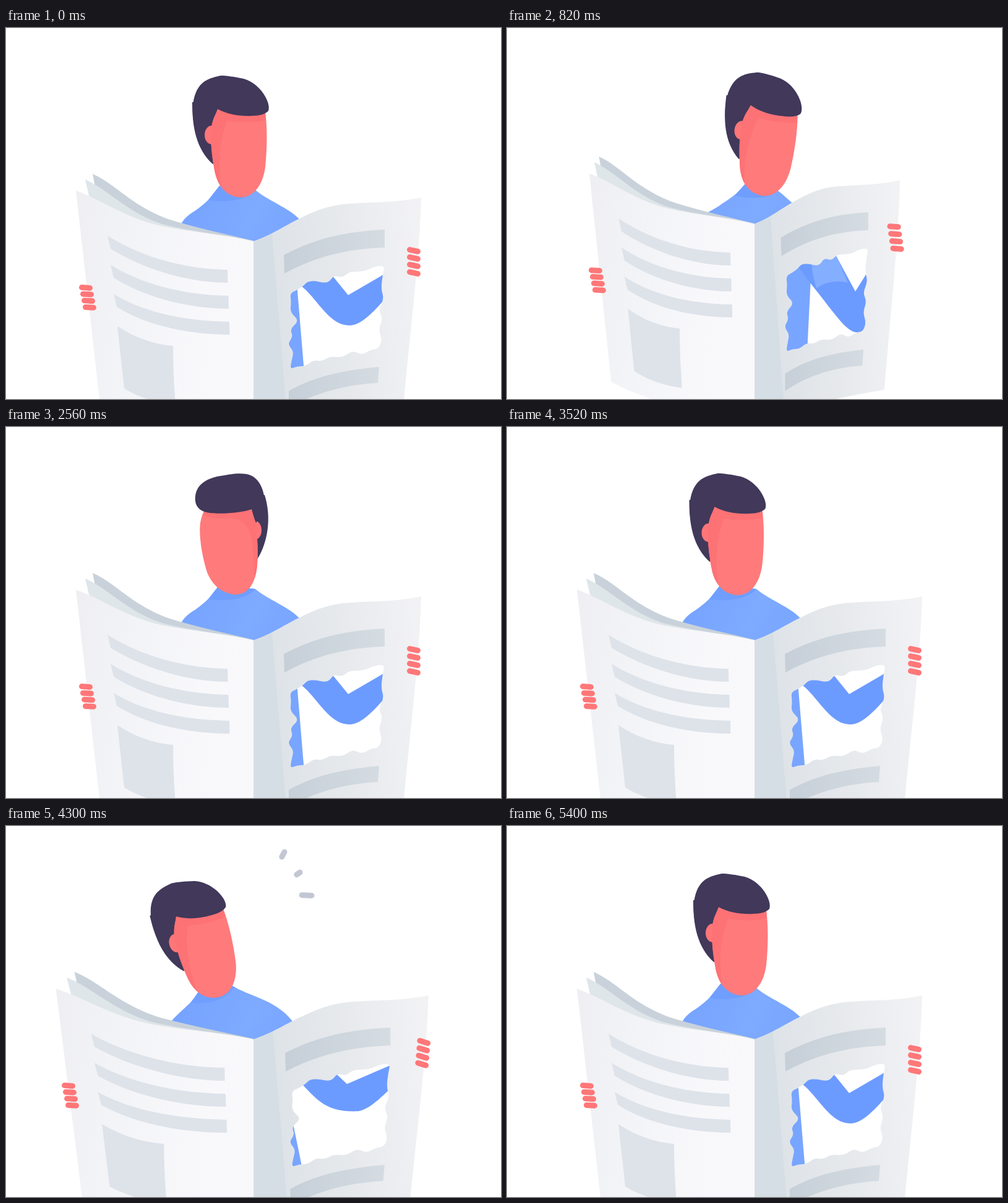
Write an HTML page that moves like this. It is 800 px wide and 600 px high and loops after 5.42 s.

```html
<!DOCTYPE html>
<html lang="en">
<head>
<meta charset="utf-8">
<title>Newspaper reader</title>
<style>
  html, body { margin: 0; width: 100%; height: 100%; overflow: hidden; background: #fff; }
  svg { display: block; width: 800px; height: 600px; }
</style>
</head>
<body>
<svg viewBox="0 0 800 600">
  <defs>
    <linearGradient id="shirt" gradientUnits="userSpaceOnUse" x1="290" y1="270" x2="460" y2="350">
      <stop offset="0" stop-color="#76a3ff"/><stop offset=".6" stop-color="#7eaaff"/><stop offset="1" stop-color="#78a5ff"/>
    </linearGradient>
    <linearGradient id="leftFill" gradientUnits="userSpaceOnUse" x1="113" y1="300" x2="400" y2="340">
      <stop offset="0" stop-color="#efeff3"/><stop offset=".3" stop-color="#f2f3f6"/><stop offset=".75" stop-color="#f8f8fb"/><stop offset="1" stop-color="#f9f9fb"/>
    </linearGradient>
    <linearGradient id="rightFill" gradientUnits="userSpaceOnUse" x1="430" y1="400" x2="670" y2="380">
      <stop offset="0" stop-color="#dee3e8"/><stop offset=".45" stop-color="#e6e9ec"/><stop offset="1" stop-color="#f2f2f5"/>
    </linearGradient>
    <linearGradient id="barFill" gradientUnits="userSpaceOnUse" x1="450" y1="0" x2="612" y2="0">
      <stop offset="0" stop-color="#c6cfd8"/><stop offset="1" stop-color="#d5dce2"/>
    </linearGradient>
    <clipPath id="faceClip"><path id="faceEdge"/></clipPath>
  </defs>

  <path id="body" fill="url(#shirt)"/>
  <path id="collar" fill="#6f9eff"/>
  <path id="arm" fill="#6c9bff"/>
  <path id="sleeve" fill="#84aeff"/>

  <g id="head">
    <path id="hairBack" fill="#41385a"/>
    <ellipse id="ear" ry="15" fill="#ff7678"/>
    <path id="face" fill="#ff7a7b"/>
    <path id="shade" fill="#fd7275" clip-path="url(#faceClip)"/>
    <path id="fringe" fill="#41385a"/>
  </g>

  <path id="sheetB" fill="#c9d2da" d="M140 236C174 250 202 287 262 309C300 321 345 331 400 344V400L160 340Z"/>
  <path id="sheetA" fill="#dfe6ea" d="M128 245C165 261 195 298 252 317C300 330 350 333 400 345V400L150 340Z"/>

  <g id="leftPage">
    <path fill="url(#leftFill)" d="M113 263C155 278 190 306 250 320C300 331 355 334 400 345V660C320 655 210 632 151 600Z"/>
    <path id="leftBars" fill="#dee3ea"/>
    <path fill="#dee3ea" d="M180 482C205 499 235 511 270 514Q270 560 274 610Q225 604 191 583Z"/>
  </g>
  <g id="rightPage">
    <path id="rightSheet" fill="url(#rightFill)" fill-rule="evenodd"/>
    <path fill="#d6dee5" d="M400 345L430 333L455 640L400 660Z"/>
    <path fill="url(#barFill)" d="M449 367C500 340 550 329 612 326V355C550 357 500 370 450 397Z"/>
    <path fill="url(#barFill)" d="M457 587C500 562 550 553 603 548L601 574C550 577 500 589 457 615Z"/>
  </g>

  <g stroke="#ff7779" stroke-width="9" stroke-linecap="round">
    <g id="leftHand"></g>
    <g id="rightHand"></g>
  </g>
  <g id="marks" stroke="#c2c7d3" stroke-width="9" stroke-linecap="round"></g>
</svg>
<script>
const LOOP = 5420;
const $ = id => document.getElementById(id);
const lerp = (a, b, k) => a + (b - a) * k;
const setPath = (id, d) => $(id).setAttribute('d', d);
const move = (id, value) => $(id).setAttribute('transform', value);

// Poses of the same path: at rest, leaning in, leaning back
const BODY = [
  'M270 340 L283 317 C290 305 297 301 305 296 C325 282 338 268 345 255 L403 262 C425 280 455 290 473 308 C478 340 470 390 471 425 L481 545 L485 640 L270 640Z',
  'M310 315 L325 298 C332 294 340 290 348 284 C365 273 377 264 385 252 L435 261 C445 268 452 275 461 283 C475 310 492 370 491 405 L486 505 L484 640 L270 640Z',
  'M253 335 L267 316 C274 307 284 299 292 291 C301 283 307 275 312 266 L365 258 C390 275 435 280 462 315 C470 340 450 400 452 425 L477 545 L485 640 L253 640Z'];
const COLLAR = [
  'M345 255 L403 262 C390 278 355 284 327 278Z',
  'M385 252 L437 262 C430 275 395 278 368 271Z',
  'M312 266 L368 260 C355 284 320 289 298 286Z'];
const ARM = [
  'M430 345 L500 350 L527 400 L553 432 L620 393 L620 430 C595 458 575 481 555 481 C522 481 505 440 478 418Z',
  'M430 330 L515 330 L530 365 L563 426 L595 375 L600 488 C590 491 575 494 563 492 C545 488 525 455 489 411Z',
  'M430 345 L500 370 L533 400 L551 417 L630 383 L630 415 C604 443 582 461 567 461 C520 462 505 446 480 419Z'];
const SLEEVE = [
  'M478 340 L510 345 L520 390 C510 386 500 386 490 392 C486 385 482 365 478 350Z',
  'M478 340 L522 345 L551 412 C535 408 515 410 500 421 C496 405 492 395 493 375Z',
  'M478 340 L510 345 L520 390 C510 386 500 386 490 392 C486 385 482 365 478 350Z'];

// Head shapes: facing right, facing left
const HAIR_BACK = [
  'M301 120 C301 160 307 195 334 220 C345 215 350 200 350 190 C352 160 352 130 350 115Z',
  'M385 110 C384 150 386 195 390 205 C394 212 400 215 406 214 C424 185 429 145 418 110Z'];
const FACE = [
  'M345 125 L418 128 C423 160 422 195 419 225 C415 255 400 273 380 274 C355 273 343 255 338 235 C332 205 330 180 332 160 C335 145 340 135 345 125Z',
  'M322 132 L397 125 C406 155 408 195 406 222 C404 252 392 270 372 271 C347 270 332 253 325 235 C314 200 311 165 315 150 C316 145 319 138 322 132Z'];
const SHADE = [
  'M325 130 L418 132 L420 149 C395 155 372 152 357 150 C346 180 340 220 350 268 L325 260Z',
  'M312 130 L420 125 L412 250 L396 262 C404 220 396 175 386 143 C365 148 340 148 312 142Z'];
const FRINGE = [
  'M342 131 C358 140 378 143 398 142 C410 142 420 139 424 134 C429 122 412 90 384 82 C370 79 356 77 347 77 C338 79 330 81 325 84 C302 95 297 130 306 165 C318 172 331 160 342 131Z',
  'M330 139 C350 141 380 139 397 133 C399 140 401 148 404 155 C412 145 417 132 418 116 C415 95 406 79 388 76 C374 74 364 76 354 78 C318 82 304 98 306 120 C307 130 316 138 330 139Z'];

// Ragged hole in the right page
const TEAR = [
  [459,429],[470,424],[481,417],[487,410],[500,409],[512,412],[522,411],[530,400],[544,404],[553,395],
  [568,394],[582,393],[594,386],[612,384],[609,398],[606,422],[611,438],[602,456],[609,470],[602,488],
  [608,504],[602,519],[590,520],[575,529],[560,521],[545,533],[524,531],[511,539],[497,537],[484,547],
  [470,547],[459,552],[462,536],[465,523],[455,511],[464,499],[459,487],[474,473],[459,460],[461,444]];

// Burst lines: inner x, y, outer x, y
const MARKS = [[433,74,450,42], [454,90,475,75], [430,109,494,112.5]];

const LEAN_IN = [[0,0], [800,1], [1640,0]];
const LEAN_BACK = [[3540,0], [4090,1.13], [5290,0]];
const TURN = [[1600,0], [2400,1], [2960,1], [3500,0]];
const IDLE_X = [[800,0], [1540,-11], [1600,-11], [2400,0], [2960,0], [3500,-6.5], [3540,-6.5], [4090,0]];
const IDLE_Y = [[800,0], [1540,-3], [1600,-3], [2400,0], [2960,0], [3500,-2], [3540,-2], [4090,0]];
const IDLE_ROT = [[800,0], [1540,-2], [1600,-2], [2400,0]];

// cubic-bezier(.33, 0, .25, 1)
function ease(x) {
  let lo = 0, hi = 1;
  for (let i = 0; i < 20; i++) {
    const s = (lo + hi) / 2, r = 1 - s;
    if (.99 * s * r * r + .75 * s * s * r + s * s * s < x) lo = s; else hi = s;
  }
  return lo * lo * (3 - 2 * lo);
}

const ramp = (t, a, b) => Math.min(1, Math.max(0, (t - a) / (b - a)));

function track(t, keys) {
  if (t <= keys[0][0]) return keys[0][1];
  for (let i = 1; i < keys.length; i++) {
    const [a, from] = keys[i - 1], [b, to] = keys[i];
    if (t < b) return lerp(from, to, ease((t - a) / (b - a)));
  }
  return keys[keys.length - 1][1];
}

// Blends paths of equal structure: base + sum of weight * (pose - base)
function blend(paths, ...weights) {
  const nums = paths.map(p => p.match(/-?[\d.]+/g).map(Number));
  let i = 0;
  return paths[0].replace(/-?[\d.]+/g, () => {
    const base = nums[0][i];
    const v = weights.reduce((sum, w, k) => sum + w * (nums[k + 1][i] - base), base);
    i++;
    return v.toFixed(2);
  });
}

function smoothLoop(pts) {
  const mid = (a, b) => `${(a[0] + b[0]) / 2} ${(a[1] + b[1]) / 2}`;
  return 'M' + mid(pts[pts.length - 1], pts[0]) +
    pts.map((p, i) => `Q${p[0]} ${p[1]} ${mid(p, pts[(i + 1) % pts.length])}`).join('') + 'Z';
}

function addLine(parent, x1, y1, x2, y2) {
  const line = document.createElementNS('http://www.w3.org/2000/svg', 'line');
  setLine(line, x1, y1, x2, y2);
  return $(parent).appendChild(line);
}

function setLine(line, ...ends) {
  ['x1', 'y1', 'x2', 'y2'].forEach((name, i) => line.setAttribute(name, ends[i]));
}

function build() {
  setPath('leftBars', [0, 1, 2].map(i => {
    const x = 164 + 5 * i, y = 336 + 47 * i, r = 358 + 1.5 * i, b = 391 + 42 * i;
    return `M${x} ${y}C${x + 36} ${y + 23} ${r - 88} ${b - 1} ${r} ${b}L${r + .5} ${b + 21}` +
      `C${r - 70} ${b + 21} ${x + 51} ${y + 50} ${x + 5} ${y + 21}Z`;
  }).join(''));
  setPath('rightSheet', 'M400 345C425 337 455 317 475 308C505 293 522 288 545 285C590 281 630 283 671 274' +
    'C668 380 652 500 642 613C580 622 480 640 400 660Z' + smoothLoop(TEAR));
  for (let i = 0; i < 4; i++) {
    const lx = 129 + 2 * i, ly = 420 + 10.6 * i, ry = 360 + 12 * i;
    addLine('leftHand', lx - 6.5, ly - .4, lx + 6.5, ly + .4);
    addLine('rightHand', 652.5, ry - 1.4, 665.5, ry + 1.4);
  }
}

const markLines = MARKS.map(m => addLine('marks', ...m));

function draw(t) {
  const w = track(t, LEAN_IN), b = track(t, LEAN_BACK), turn = track(t, TURN);

  setPath('body', blend(BODY, w, b));
  setPath('collar', blend(COLLAR, w, b));
  setPath('arm', blend(ARM, w, b));
  setPath('sleeve', blend(SLEEVE, w, b));

  const hx = track(t, IDLE_X) + 34 * w - 37 * b;
  const hy = track(t, IDLE_Y) - 2.5 * w + 3 * b;
  const rot = track(t, IDLE_ROT) + 7.3 * w - 13.5 * b;
  move('head', `translate(${hx} ${hy}) rotate(${rot} 380 270)`);
  const face = blend(FACE, turn);
  setPath('face', face);
  setPath('faceEdge', face);
  setPath('hairBack', blend(HAIR_BACK, turn));
  setPath('shade', blend(SHADE, turn));
  setPath('fringe', blend(FRINGE, turn));
  $('ear').setAttribute('cx', lerp(332, 403, turn));
  $('ear').setAttribute('cy', lerp(173, 167, turn));
  $('ear').setAttribute('rx', lerp(11, 10, turn));

  const fold = (id, narrow, widen) =>
    move(id, `translate(400 ${-28 * w}) scale(${1 - narrow * w + widen * b} 1) translate(-400 0)`);
  fold('sheetB', .033, .115);
  fold('sheetA', .048, .112);
  fold('leftPage', .07, .115);
  fold('rightPage', .133, .044);
  move('leftHand', `translate(${14 * w - 28.5 * b} ${-28 * w})`);
  move('rightHand', `translate(${15 * b - 31 * w} ${-39 * w - 11 * b}) rotate(${5 * b - 8 * w} 659 378)`);

  const end = ease(ramp(t, 3760, 4020)), start = ramp(t, 4060, 4380);
  $('marks').style.display = end > 0 && start < 1 ? '' : 'none';
  MARKS.forEach(([x1, y1, x2, y2], i) => setLine(markLines[i],
    lerp(x1, x2, start), lerp(y1, y2, start), lerp(x1, x2, end), lerp(y1, y2, end)));
}

build();
const begin = performance.now();
function tick() {
  draw((performance.now() - begin) % LOOP);
  requestAnimationFrame(tick);
}
tick();
</script>
</body>
</html>
```
